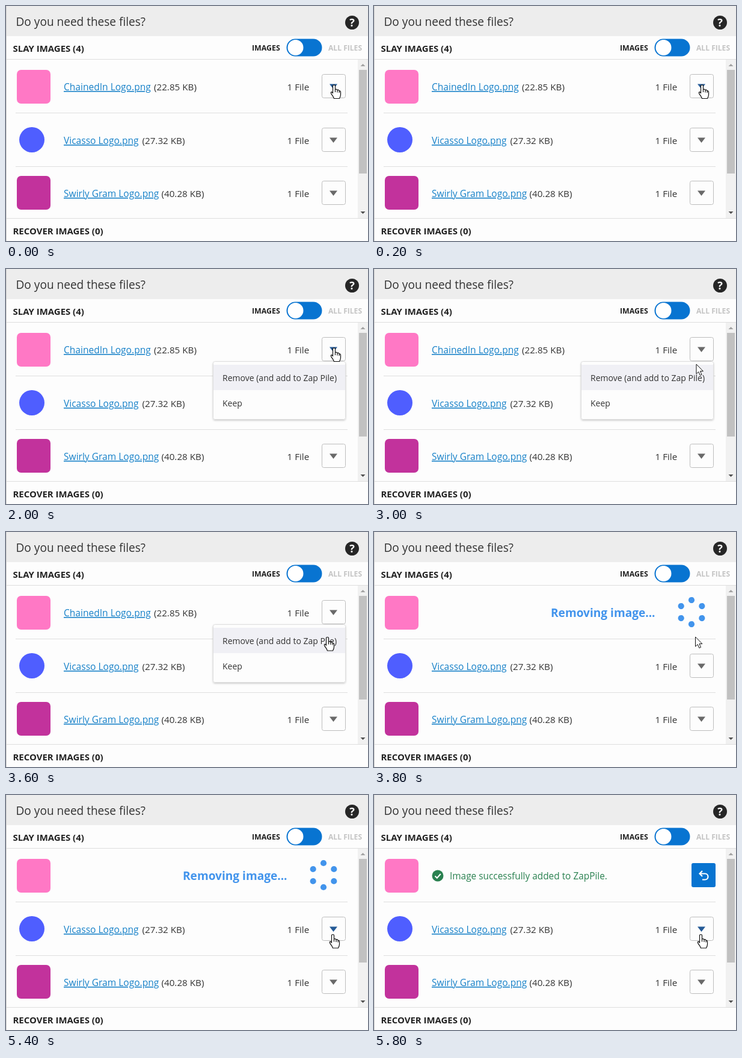
An HTML page that plays this animation: 602x390 px, repeating every 6.4 s.

```html
<!DOCTYPE html>
<html lang="en">
<head>
<meta charset="utf-8">
<title>File review panel</title>
<style>
  html, body { margin: 0; width: 100%; height: 100%; overflow: hidden; background: #fdfdfd; }
  svg { display: block; width: 602px; height: 390px; }
  text { font-family: "Open Sans", "Noto Sans", sans-serif; font-size: 15.2px; fill: #333; white-space: pre; }
  .bold { font-weight: 700; }
  .head { font-size: 14.95px; fill: #222; }
  .link { font-size: 15.55px; fill: #1580c8; text-decoration: underline; }
  .line { stroke: #dedede; }
  .menu text { font-size: 14px; }
</style>
</head>
<body>
<svg id="stage" viewBox="0 0 602 390">
  <defs>
    <filter id="shadow" x="-10%" y="-10%" width="120%" height="130%">
      <feDropShadow dx="0" dy="1.5" stdDeviation="1.5" flood-color="#000" flood-opacity=".2"/>
    </filter>
  </defs>
  <rect width="602" height="390" fill="#fdfdfd"/>
  <rect width="602" height="50" fill="#ededed"/>
  <text x="16.5" y="33" style="font-size:19.05px">Do you need these files?</text>
  <circle cx="575.5" cy="27.5" r="11.5" fill="#262626"/>
  <text class="bold" x="575.5" y="34" text-anchor="middle" style="font-size:18px;fill:#fff">?</text>

  <text class="bold head" x="11.5" y="76">SLAY IMAGES (4)</text>
  <text class="bold" x="409" y="74" style="font-size:12.4px;fill:#222">IMAGES</text>
  <rect x="466.5" y="54.5" width="59" height="29" rx="14.5" fill="#0874d1"/>
  <circle cx="481.5" cy="69" r="13" fill="#fff"/>
  <text class="bold" x="536" y="74" style="font-size:12.1px;fill:#c4c4c4">ALL FILES</text>

  <path class="line" d="M0 88.5H602M0 352.5H602M16 177.5H568M16 266.5H568"/>
  <text class="bold head" x="11.5" y="379">RECOVER IMAGES (0)</text>

  <rect x="585" y="89" width="17" height="263" fill="#f1f1f1"/>
  <rect x="587" y="106" width="13" height="172" fill="#c1c1c1"/>
  <path d="M589.5 100L593.5 96L597.5 100Z" fill="#a3a3a3"/>
  <path d="M589.5 341L593.5 345L597.5 341Z" fill="#505050"/>
  <path d="M.5 0V390" stroke="#cfcfcf"/>

  <rect x="18" y="106" width="56" height="56" rx="7" fill="#ff78c5"/>
  <circle cx="43" cy="222" r="21" fill="#4f5eff"/>
  <rect x="18" y="282" width="56" height="56" rx="7" fill="#c2329c"/>

  <g id="rows"></g>

  <g id="busy">
    <text class="bold" x="294" y="141" style="font-size:19.1px;fill:#4294ec">Removing image...</text>
    <g id="dots" fill="#4294ec"></g>
  </g>

  <g id="done">
    <circle cx="106" cy="134" r="9.5" fill="#2a8150"/>
    <path d="M101.5 134.5L104.8 137.7L110.8 131" fill="none" stroke="#fff" stroke-width="2"/>
    <text x="126" y="140" style="font-size:15.4px;fill:#2a8150">Image successfully added to ZapPile.</text>
    <rect x="528" y="113" width="40" height="40" rx="3" fill="#0874d1"/>
    <path d="M546 126L541.5 130.5L546 135M542 130.5H550.5A4.8 4.8 0 0 1 550.5 140.5H546" fill="none" stroke="#fff" stroke-width="2.2"/>
  </g>

  <g id="menu" class="menu">
    <rect x="344.5" y="153.5" width="220" height="96" rx="3" fill="#fdfdfd" stroke="#dedede" filter="url(#shadow)"/>
    <rect x="345" y="159" width="219" height="42" fill="#f0f0f5"/>
    <text x="360" y="186">Remove (and add to Zap Pile)</text>
    <text x="360" y="228">Keep</text>
  </g>

  <g id="cursor" fill="#fff" stroke="#111" stroke-linejoin="round">
    <path id="arrow" d="M0 0V16L3.8 12.6L6.3 18.5L9 17.4L6.5 11.6H11.4Z"/>
    <g id="hand" stroke-width="1.2">
      <path d="M-2 13.5V2Q-2 0 0 0T2 2V7.5Q4.5 6.5 5.5 8.5Q8 7.5 8.7 9.8Q11 9.5 11 12V16Q11 19 9 22.5H0Q-1.5 18.5 -4.5 15Q-6 12 -4 11.5Z"/>
      <path d="M2 7.5V12M5.5 8.5V12.5M8.7 9.8V13" fill="none"/>
    </g>
  </g>
</svg>
<script>
const LOOP = 6400, STEP = 200;
const NS = "http://www.w3.org/2000/svg";
const $ = id => document.getElementById(id);
const show = (el, on) => { el.style.display = on ? "" : "none"; };

function add(parent, tag, attrs, text) {
  const el = document.createElementNS(NS, tag);
  for (const k in attrs) el.setAttribute(k, attrs[k]);
  if (text) el.textContent = text;
  return parent.appendChild(el);
}

// name, size, x of size, text baseline, button top
const files = [
  ["ChainedIn Logo.png", "(22.85 KB)", 246, 140, 113.5],
  ["Vicasso Logo.png", "(27.32 KB)", 226.5, 229, 202.5],
  ["Swirly Gram Logo.png", "(40.28 KB)", 258.5, 317, 290.5]
];
const rows = files.map(([name, size, sizeX, base, top]) => {
  const g = add($("rows"), "g", {});
  add(g, "text", { x: 96, y: base, class: "link" }, name);
  add(g, "text", { x: sizeX, y: base }, size);
  add(g, "text", { x: 467.5, y: base }, "1 File");
  const box = add(g, "rect", { x: 525.5, y: top, width: 39, height: 39, rx: 3, fill: "#fdfdfd", stroke: "#bdbdbd" });
  const y = top + 16;
  const tri = add(g, "path", { d: `M538 ${y}H551L544.5 ${y + 8.5}Z` });
  return { g, box, tri };
});

for (let i = 0; i < 6; i++) {
  const a = i * Math.PI / 3;
  add($("dots"), "circle", { cx: 528 + 20 * Math.sin(a), cy: 133 - 20 * Math.cos(a), r: 5.1 });
}

// start time, x, y, pointer kind
const moves = [
  [0, 545.5, 131, "hand"],
  [2600, 545.5, 132, "hand"],
  [2800, 542.5, 135, "hand"],
  [3000, 536, 158, "arrow"],
  [3200, 535.5, 167, "hand"],
  [3400, 534.5, 174.5, "hand"],
  [3800, 534.5, 174, "arrow"],
  [4600, 542, 215, "hand"],
  [4800, 543.5, 231.5, "hand"]
];

function draw(ms) {
  const t = Math.floor((ms % LOOP) / STEP) * STEP;
  const [, x, y, kind] = moves.filter(m => m[0] <= t).pop();
  const removing = t >= 3800 && t < 5600;
  const focus = t >= 1800 && t < 2000;

  show(rows[0].g, t < 3800);
  show($("menu"), t >= 2000 && t < 3800);
  show($("busy"), removing);
  show($("done"), t >= 5600);

  rows[0].box.setAttribute("stroke", focus ? "#5b9ad8" : "#bdbdbd");
  rows[0].box.style.filter = focus ? "drop-shadow(0 0 1.5px #70aee8)" : "none";
  const hovered = t < 3000 ? 0 : t >= 4600 ? 1 : -1;
  rows.forEach((r, i) => r.tri.setAttribute("fill", i === hovered ? "#255a96" : "#696969"));

  // one sixth of a turn per step
  $("dots").setAttribute("transform", `rotate(${t / STEP * 60} 528 133)`);

  $("cursor").setAttribute("transform", `translate(${x} ${y})`);
  show($("hand"), kind === "hand");
  show($("arrow"), kind === "arrow");
}

const start = performance.now();
function frame() {
  draw(performance.now() - start);
  requestAnimationFrame(frame);
}
frame();
</script>
</body>
</html>
```
